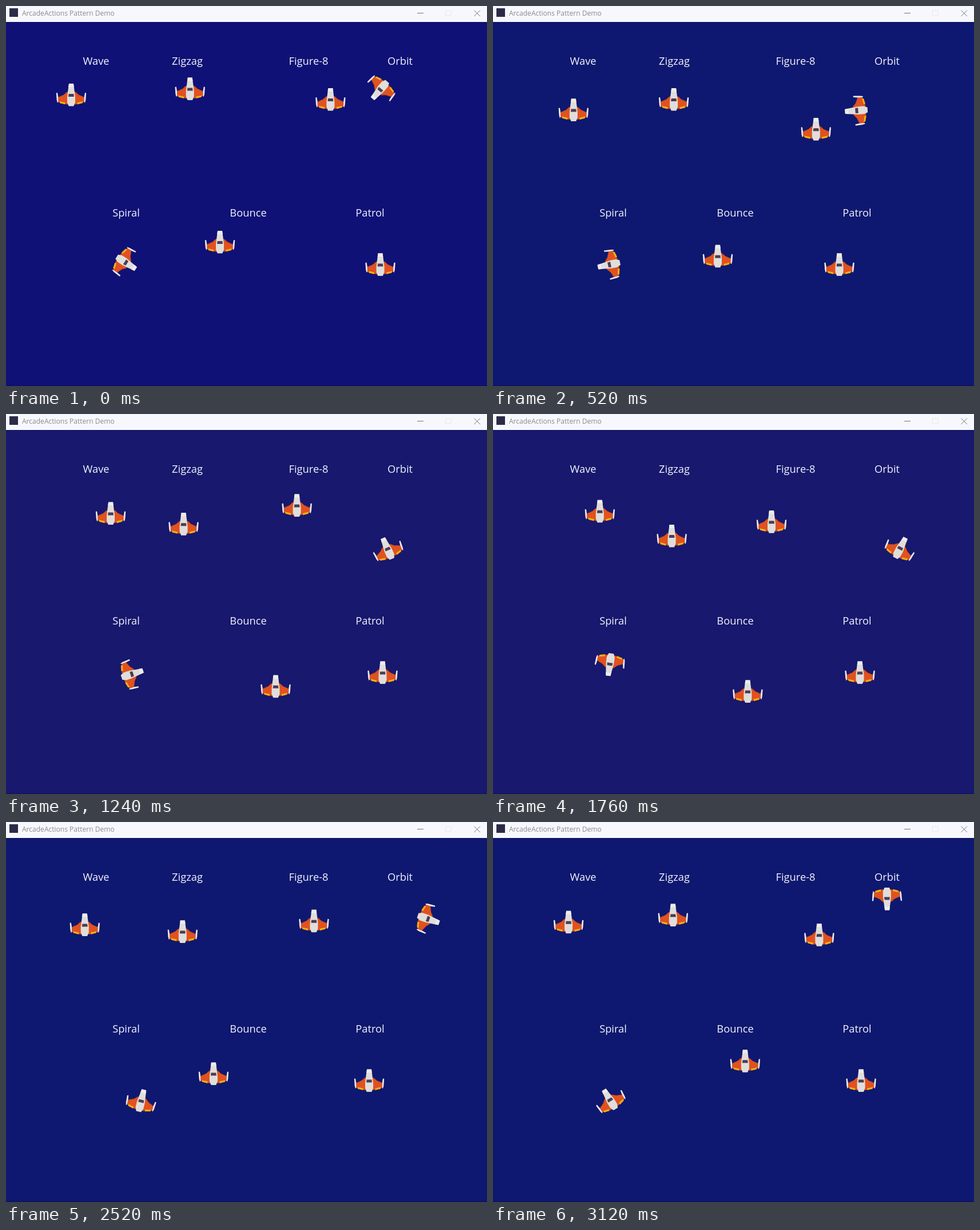
Write an HTML page that moves like this. It is 841 px wide and 666 px high and loops after 3.16 s.

```html
<!DOCTYPE html>
<html lang="en">
<head>
<meta charset="utf-8">
<title>ArcadeActions Pattern Demo</title>
<style>
  html, body { margin: 0; width: 100%; height: 100%; overflow: hidden; background: #0e1870; }
  svg { display: block; width: 841px; height: 666px; }
  text { font-family: "Open Sans", "Noto Sans", sans-serif; }
  .labels text { font-size: 18.3px; fill: #f4f4fa; text-anchor: middle; }
</style>
</head>
<body>
<svg viewBox="0 0 841 666">
  <defs>
    <g id="wing">
      <path d="M-5-6 L-8-5 L-13-.5 L-23 4 V12 L-7 16.5 L-5 16Z" fill="#e0521f" stroke="#8c3a34" stroke-width=".6"/>
      <path d="M-20.5 11 L-10.5 13.2 V16.6 L-20 14.2Z" fill="#f4b012"/>
      <path d="M-26.2-3.5 L-24-4 L-22.8 3 L-22.6 12 L-24 13.8 L-25.3 9Z" fill="#eceaea"/>
    </g>
    <g id="ship">
      <use href="#wing"/>
      <use href="#wing" transform="scale(-1 1)"/>
      <path d="M-4-20 H4 L5.2-11 L7 3 V13 L4.3 19.5 H-4.3 L-7 13 V3 L-5.2-11Z" fill="#e0dedb"/>
      <path d="M-4-20 H4 L4.8-14 H-4.8Z" fill="#eeecea"/>
      <path d="M-4.3-2 H4.3 L5 3 H-5Z" fill="#4a3c54"/>
    </g>
  </defs>

  <rect id="sky" width="841" height="666"/>
  <path d="M0 28.5 H841 M0 665.5 H841" stroke="#000" opacity=".25"/>

  <rect width="841" height="28" fill="#f7f8fe"/>
  <rect x="6" y="4" width="15" height="15" fill="#2b2b48"/>
  <text x="28" y="17" font-size="12.05" fill="#8b8b8d">ArcadeActions Pattern Demo</text>
  <g fill="none" stroke="#747478">
    <path d="M719 12.5 H730"/>
    <path d="M768.5 7.5 H778 V17 H768.5Z" stroke="#ece4e6"/>
    <path d="M818.5 7.5 L829 18 M829 7.5 L818.5 18"/>
  </g>

  <g class="labels">
    <text x="157.5" y="103">Wave</text>
    <text x="317" y="103">Zigzag</text>
    <text x="529" y="103">Figure-8</text>
    <text x="689" y="103">Orbit</text>
    <text x="210" y="368.5">Spiral</text>
    <text x="423.5" y="368.5">Bounce</text>
    <text x="636.5" y="368.5">Patrol</text>
  </g>
  <g id="fleet"></g>
</svg>

<script>
const LOOP = 3160, STEP = 40;
const sky = document.getElementById("sky");
const fleet = document.getElementById("fleet");
const rad = deg => deg * Math.PI / 180;

// Triangle wave: 0 up to span, then back to 0.
const fold = (v, span) => {
  const m = ((v % (2 * span)) + 2 * span) % (2 * span);
  return m < span ? m : 2 * span - m;
};

// Piecewise linear lookup in rows of [key, value, ...].
function lookup(rows, key, col = 1) {
  const i = Math.max(1, rows.findIndex(row => key <= row[0]));
  const a = rows[i - 1], b = rows[i];
  return a[col] + (b[col] - a[col]) * (key - a[0]) / (b[0] - a[0]);
}

const PACE = [
  [0, 0], [520, 49], [1240, 126], [1640, 171.8], [1680, 171.8], [1760, 181],
  [2200, 236.5], [2240, 241.4], [2280, 241.4], [2520, 270.5], [3160, 352]
];

// Distance, radius, position angle, heading.
const SPIRAL = [
  [0, 3.5, 270, 33], [49, 7, 180, 168], [126, 10.8, 12, 342], [181, 15.7, -112, 458],
  [236.5, 28.7, -239, 578], [270.5, 44, -307, 644], [297, 55, -358, 697]
];

// Each pattern maps distance to [x, y, heading]; heading -90 points up.
const patterns = [
  function wave(s) {
    const p = fold(0.548 * s, 86) / 86;
    return [114 + 86 * p, 156 + 32 * Math.sin(Math.PI * p)];
  },
  function zigzag(s) {
    const rise = Math.abs(74.7 - 0.379 * s);
    return [300.5 + fold(rise, 16) * 31.7 / 16, 220.2 - rise];
  },
  function figureEight(s) {
    const a = rad(1.135 * s - 24);
    return [529 + 42 * Math.cos(a), 187.7 + 32 * Math.sin(2 * a)];
  },
  function orbit(s) {
    const a = 229.5 - 0.919 * s;
    return [688.3 + 53 * Math.cos(rad(a)), 187.5 + 53 * Math.sin(rad(a)), -a];
  },
  function spiral(s) {
    const d = 297 - Math.abs(297 - s);
    const r = lookup(SPIRAL, d), a = rad(lookup(SPIRAL, d, 2));
    return [210 + r * Math.cos(a), 453.5 + r * Math.sin(a), lookup(SPIRAL, d, 3)];
  },
  function bounce(s) {
    return [358.5 + fold(1.02 * s - 15.5, 128), 411 + fold(0.505 * s + 3, 85)];
  },
  function patrol(s) {
    return [593.5 + fold(s + 107, 84), 453.5];
  }
];

const ships = patterns.map(() => {
  const ship = document.createElementNS("http://www.w3.org/2000/svg", "use");
  ship.setAttribute("href", "#ship");
  return fleet.appendChild(ship);
});

function skyColor(t) {
  if (t < 280) return "#0f1177";
  return t >= 1160 && t < 2320 ? "#17186e" : "#0e1870";
}

function render(time) {
  const t = Math.floor((time % LOOP) / STEP) * STEP;
  const s = lookup(PACE, t);
  sky.setAttribute("fill", skyColor(t));
  patterns.forEach((pattern, i) => {
    const [x, y, heading = -90] = pattern(s);
    ships[i].setAttribute("transform",
      `translate(${x.toFixed(2)} ${y.toFixed(2)}) rotate(${(heading + 90).toFixed(2)})`);
  });
}

const start = performance.now();
function tick() {
  render(performance.now() - start);
  requestAnimationFrame(tick);
}
tick();
</script>
</body>
</html>
```
